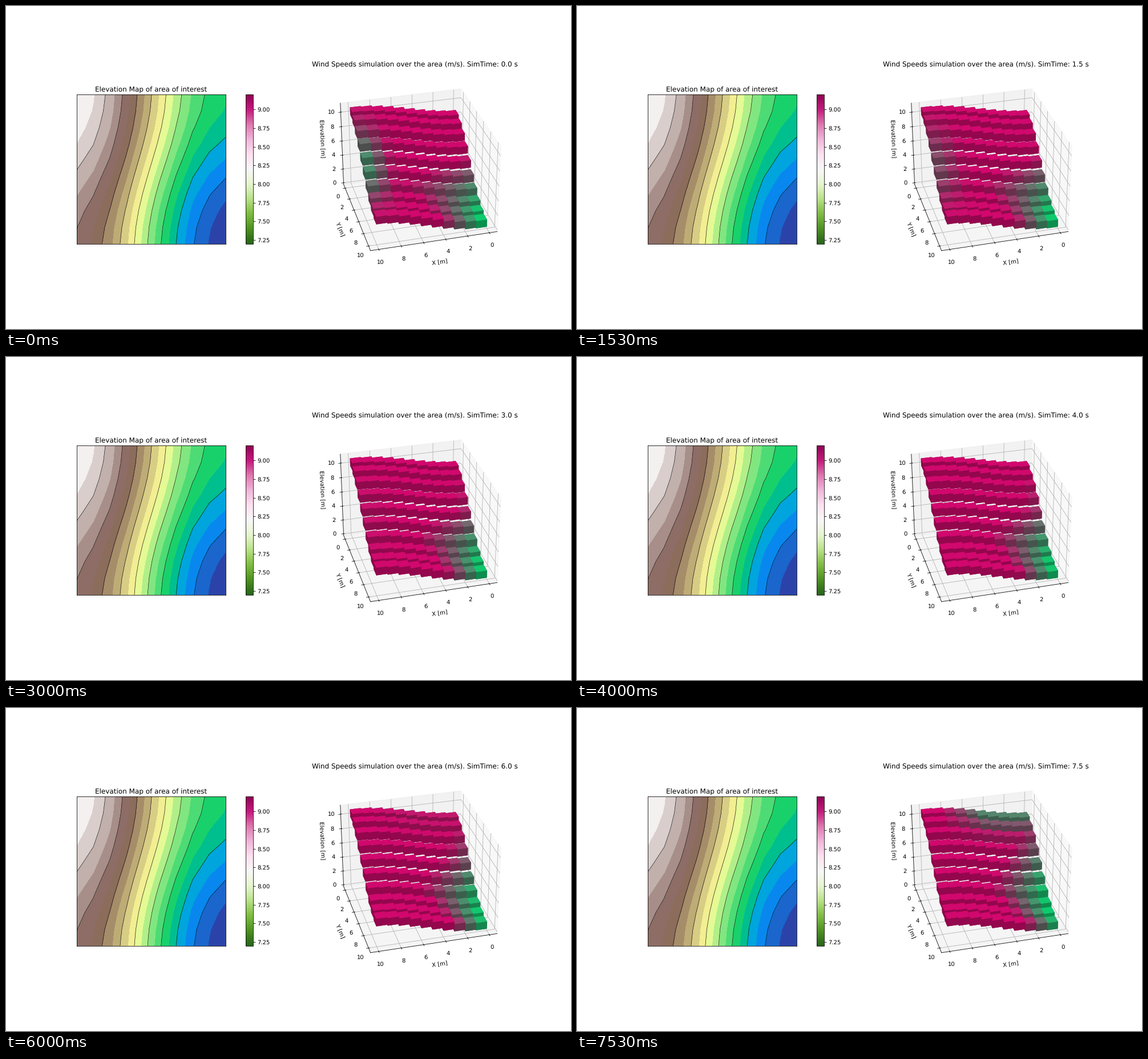
Recreate the animation shown at these times as a matplotlib script. Size 990 px wide and 566 px high, loop 8000 ms.

```python
import numpy as np
import matplotlib.pyplot as plt
from matplotlib.animation import FuncAnimation
from matplotlib.cm import ScalarMappable
from matplotlib.colors import Normalize

W, H, DPI = 990, 566, 72
N = 10
STEP = 0.5
STEPS = 16

plt.rcParams["font.family"] = "DejaVu Sans"
plt.rcParams["text.hinting"] = "none"

fig = plt.figure(figsize=(W / DPI, H / DPI), dpi=DPI, facecolor="white")


def add_box(x, y, w, h):
    """Axes placed in pixels, measured from the top left."""
    return fig.add_axes([x / W, 1 - (y + h) / H, w / W, h / H])


# Terrain: profiles at both ends of x, joined by a soft S-curve
idx = np.arange(N)
low = np.array([7.89, 7.4, 6.65, 5.6, 4.35, 3.1, 2.0, 1.05, 0.45, 0])
high = np.array([10, 9.55, 8.8, 7.75, 6.6, 5.45, 4.3, 3.4, 2.85, 2.58])
rise = 0.8 * (1 - np.cos(np.pi * idx / 9)) / 2 + 0.2 * idx / 9
rise = rise[:, None] ** (0.9 + 0.02 * idx)
terrain = np.clip(low + (high - low) * rise, 0, 10)

# Elevation map
SIDE = 261.56
ax_map = add_box(123.75, 155.05, SIDE, SIDE)
ax_map.contourf(terrain, levels=np.linspace(0, 10, 21), cmap="terrain")
ax_map.contour(terrain, levels=np.arange(1, 10), colors="black", linewidths=0.6)
ax_map.set_xticks([])
ax_map.set_yticks([])
ax_map.set_title("Elevation Map of area of interest")

ax_bar = add_box(420.2, 155.05, SIDE / 20, SIDE)
fig.colorbar(ScalarMappable(Normalize(7.2, 9.2), "PiYG_r"), cax=ax_bar,
             ticks=np.arange(7.25, 9.01, 0.25))

# Wind view
ax = fig.add_subplot(1, 2, 2, projection="3d")
ax.view_init(elev=30, azim=75)
margin = 11 / 48
ax.set_xlabel("X [m]")
ax.set_ylabel("Y [m]")
ax.set_zlabel("Elevation [m]")
title = ax.set_title("")

gx, gy = (g.ravel() for g in np.meshgrid(idx, idx, indexing="ij"))

# Brightness of the faces -z, +z, -y, +y, -x, +x
SHADES = np.array([0.55, 0.82, 0.58, 0.58, 0.58, 0.55])

CALM_START = np.array([0, 0, 0, 0, 0.08, 0.42, 0.64, 0.78, 0.92, 0.97])
CALM_END = np.array([0, 0, 0.15, 0.4, 0.6, 0.77, 0.9, 0.94, 0.97, 0.85])


def calmness(t):
    """0 where the wind is strong, 1 where it is weak."""
    fade = max(0, 1 - t / 3.2)
    crest = 0.68 * fade * np.exp(-((9 - gx) / 1.4) ** 2 - ((gy - 4.5) / 2.8) ** 2)

    u = (t / 7.5) ** 2
    edge = (CALM_START * (1 - u) + CALM_END * u)[gy]
    slope = 0.1 + 0.05 * np.maximum(0, gy - 6) + 0.012 * t
    valley = np.clip(edge - slope * gx, 0, 1)

    gust = np.clip((t - 5.5) / 2, 0, 1) ** 1.5
    ridge = 0.62 * gust * np.exp(-(gy / 1.5) ** 2) * np.clip((8 - gx) / 4, 0, 1)
    return np.clip(crest + valley + ridge, 0, 1)


def face_colors(m):
    rgb = np.column_stack([1 - m, m, np.full_like(m, 0.5)])
    rgb = 0.04 + 0.96 * rgb
    return (rgb[:, None, :] * SHADES[:, None]).reshape(-1, 3)


bars = None


def draw(i):
    global bars
    t = i * STEP
    if bars is not None:
        bars.remove()
    bars = ax.bar3d(gx, gy, terrain.ravel(), 1, 1, 1,
                    color=face_colors(calmness(t)), shade=False)
    ax.set_xlim(-0.5 - margin, 10.5 + margin)
    ax.set_ylim(-0.5 - margin, 10.5 + margin)
    ax.set_zlim(-margin, 11 + margin)
    for axis in (ax.xaxis, ax.yaxis, ax.zaxis):
        axis.set_ticks(range(0, 11, 2))
    title.set_text(f"Wind Speeds simulation over the area (m/s). SimTime: {t:.1f} s")
    return bars, title


anim = FuncAnimation(fig, draw, frames=STEPS, interval=1000 * STEP,
                     repeat=True, blit=False)
plt.show()
```
